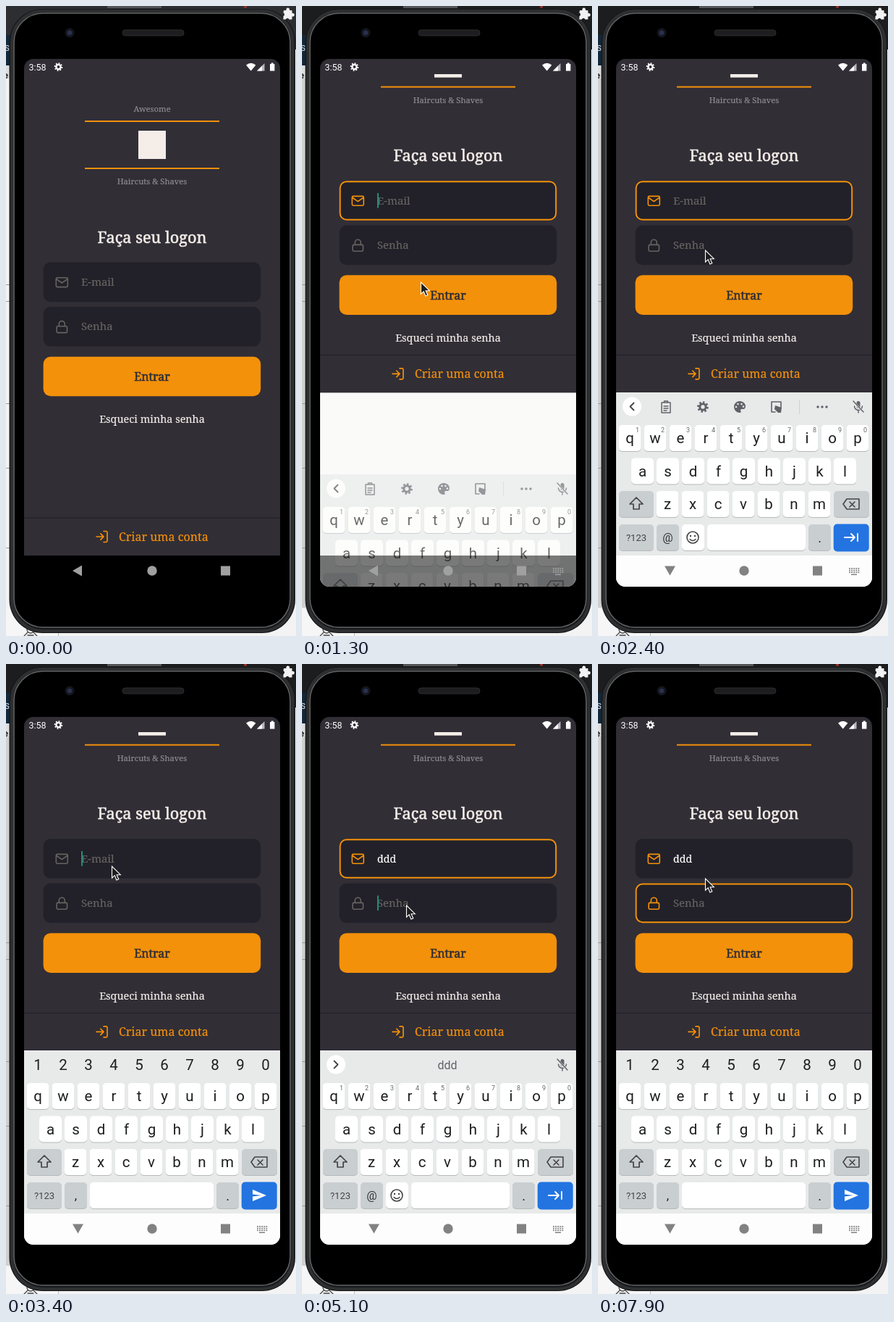
An HTML page for the animation above (8 s loop, 401 by 869 pixels).

```html
<!DOCTYPE html>
<html lang="pt-BR">
<head>
<meta charset="utf-8">
<title>Logon</title>
<style>
html, body { margin: 0; width: 100%; height: 100%; overflow: hidden; background: #fff; }
svg { display: block; width: 401px; height: 869px; }
.slab { font-family: "Roboto Slab", "Noto Serif", serif; stroke: currentColor; stroke-width: .2; }
.slab.medium { stroke-width: .6; }
.sans { font-family: Roboto, sans-serif; }
.line { fill: none; stroke-linecap: round; stroke-linejoin: round; }
</style>
</head>
<body>
<svg id="stage" viewBox="0 0 401 869" xmlns="http://www.w3.org/2000/svg"></svg>
<script>
const LOOP = 8000, STEP = 100;
const ORANGE = '#f4910a', DARK = '#312e36', FIELD = '#222129', HINT = '#666360', LIGHT = '#f4ede8';
const KEY = '#fff', GREY = '#c9ced1', INK = '#5f6368';

const rect = (x, y, w, h, fill, r = 0, more = '') =>
  `<rect x="${x}" y="${y}" width="${w}" height="${h}" rx="${r}" fill="${fill}" ${more}/>`;
const circle = (x, y, r, fill, more = '') => `<circle cx="${x}" cy="${y}" r="${r}" fill="${fill}" ${more}/>`;
const path = (d, fill, more = '') => `<path d="${d}" fill="${fill}" ${more}/>`;
const line = (d, color, w = 2, more = '') =>
  `<path class="line" d="${d}" stroke="${color}" stroke-width="${w}" ${more}/>`;
const text = (s, x, y, size, color, face = 'slab', anchor = 'middle', more = '') =>
  `<text class="${face}" x="${x}" y="${y}" font-size="${size}" color="${color}" fill="currentColor" text-anchor="${anchor}" ${more}>${s}</text>`;
const group = (id, body) => `<g id="${id}">${body}</g>`;
const at = (x, y, k, body) => `<g transform="translate(${x} ${y}) scale(${k}) translate(-12 -12)">${body}</g>`;
const gear = (x, y, k, color) => `<g transform="translate(${x} ${y}) scale(${k})">` +
  circle(0, 0, 3.1, 'none', `stroke="${color}" stroke-width="2.3"`) +
  circle(0, 0, 4.8, 'none', `stroke="${color}" stroke-width="2" pathLength="16" stroke-dasharray="1 1"`) + '</g>';

function backdrop() {
  return rect(0, 0, 401, 869, '#f3f3f3') + rect(0, 0, 401, 60, '#2d2e31', 0, 'id="bar"') +
    rect(0, 40, 12, 42, '#14283c') + rect(0, 82, 12, 18, '#dedede') +
    text('s', -2, 62, 14, '#cdd5dc', 'sans', 'start') +
    text('e', -4, 100, 13, '#222', 'sans', 'start', 'font-weight="700"') +
    rect(0, 100, 14, 730, '#f3f3f3', 0, 'id="strip"') +
    [384, 407, 548, 637, 747].map(y => rect(0, y, 8, 1, '#999')).join('') +
    rect(0, 832, 73, 37, '#f6f6f6') + rect(72, 855, 1, 14, '#bbb') +
    circle(34, 860, 5, 'none', 'stroke="#444" stroke-width="1.3"') +
    line('M25 869l5-5M43 869l-5-5M30 868h8', '#444', 1.3) +
    rect(140, 0, 75, 3, '#55565a') + circle(331, 1, 2, '#a33030');
}

function phone() {
  const puzzle = path('M384 6h3.5a2.5 2.5 0 1 1 4.6 0h3.4v4a2.4 2.4 0 1 1 0 4.4v4h-4a2.4 2.4 0 0 0-4.6 0h-3.4v-4.4a2.3 2.3 0 0 0 0-4.4z', '#f2f2f2');
  return rect(4.5, 4, 395.5, 861, '#17181a', 46) +
    rect(8, 7, 388.5, 855, 'none', 43, 'stroke="#2e2f31" stroke-width="4"') +
    rect(11, 10, 382, 847, '#000', 40, 'stroke="#626365" stroke-width="1.6"') +
    rect(161, 33, 85, 8, '#1d1d1f', 4, 'stroke="#2d2d2f"') +
    circle(88, 37, 6.5, '#15161d') + circle(88, 37, 3.2, '#2b3050') + puzzle;
}

const mailIcon = '<path class="line" d="M4 4h16a2 2 0 0 1 2 2v12a2 2 0 0 1-2 2H4a2 2 0 0 1-2-2V6a2 2 0 0 1 2-2zM22 6l-10 7L2 6" stroke-width="2"/>';
const lockIcon = '<path class="line" d="M5 11h14a2 2 0 0 1 2 2v7a2 2 0 0 1-2 2H5a2 2 0 0 1-2-2v-7a2 2 0 0 1 2-2zM7 11V7a5 5 0 0 1 10 0v4" stroke-width="2"/>';

function field(id, y, icon, hint) {
  return rect(51.6, y, 300.6, 54.6, FIELD, 10) +
    rect(52.6, y + 1, 298.6, 52.6, 'none', 9, `id="${id}Box" stroke="${ORANGE}" stroke-width="2"`) +
    group(id + 'Icon', at(77.3, y + 27.6, .8, icon)) +
    text(hint, 104, y + 32.4, 14.9, HINT, 'slab', 'start', `id="${id}Text"`) +
    rect(104, y + 16.9, 2, 20.5, '#1f8f78', 0, `id="${id}Caret"`);
}

function app() {
  const page = text('Awesome', 202, 146, 11.2, '#8d8a90') +
    rect(109, 158, 186, 2, ORANGE) + rect(183, 172, 38, 39, LIGHT) + rect(109, 223, 186, 2, ORANGE) +
    text('Haircuts &amp; Shaves', 202, 246, 11.2, '#8d8a90') +
    text('Faça seu logon', 202, 326.5, 21.7, LIGHT, 'slab medium') +
    field('mail', 353.6, mailIcon, 'E-mail') + field('pass', 415, lockIcon, 'Senha') +
    rect(51.6, 483.7, 300.6, 54.6, ORANGE, 10) +
    text('Entrar', 202, 517, 15.9, DARK, 'slab medium') +
    text('Esqueci minha senha', 202, 575, 14.4, LIGHT);
  const foot = rect(25, 706, 354, 52, DARK) + rect(25, 705.5, 354, 1.2, FIELD) +
    at(132.5, 732, .83, line('M15 3h4a2 2 0 0 1 2 2v14a2 2 0 0 1-2 2h-4M10 17l5-5-5-5M15 12H3', ORANGE)) +
    text('Criar uma conta', 156, 738, 16, ORANGE, 'slab', 'start');
  return rect(25, 73, 354, 685, DARK) + `<g clip-path="url(#body)">${group('page', page)}</g>` +
    rect(25, 533, 354, 268, '#fafaf9', 0, 'id="blank"') + group('foot', foot);
}

function status() {
  return text('3:58', 31.5, 88.5, 12.5, '#fff', 'sans', 'start') + gear(72.5, 84, 1, '#fff') +
    path('M332 81.5q6.7-5.5 13.4 0l-6.7 8z', '#fff') +
    path('M347 89.5L357.5 79v10.5z', '#bbb9bd') + path('M347 89.5l7-7v7z', '#fff') +
    path('M365 80h1.7v-1.5h3V80h1.7v9.5H365z', '#fff');
}

const key = (x, y, w, fill = KEY) => rect(x, y + 1, w, 36, '#b5b9bc', 5) + rect(x, y, w, 36, fill, 5);
const row = (s, x, y) => [...s].map((c, i) => key(x - 15.5 + i * 35, y, 31) +
  text(c, x + i * 35, y + 25, 20.5, '#1d1e20', 'sans')).join('');

function toolbar() {
  const clip = line('M88 547h12v14H88zM91.5 547v-2h5v2M91 552h6M91 555h6M91 558h4', INK, 1.5);
  const palette = path('M196 545a8 8 0 1 0 0 16c2 0 2-1.5 1.3-2.5-.8-1.5 0-2.5 1.7-2.5h2c2 0 3-2 3-4 0-4-4-7-8-7z', INK) +
    [[191, 553], [193.5, 549], [198.5, 549], [201, 552.5]].map(p => circle(...p, 1.3, '#e8eaea')).join('');
  const sticker = line('M245 560h-5v-14h13v8', INK, 1.6) + path('M245 551l9 3-1 7h-4l-5-5z', INK);
  const dots = [304, 310, 316].map(x => circle(x, 553, 1.7, INK)).join('');
  return line('M49.5 547.5l-5 5 5 5', '#444', 1.8) +
    clip + gear(145, 553, 1.35, INK) + palette + sticker + rect(278, 543, 1, 20, '#cfd2d3') + dots;
}

function keyboard() {
  const mic = rect(357.5, 545, 5, 10, INK, 2.5) + line('M354.5 552a5.5 5.5 0 0 0 11 0M360 558v3', INK, 1.5) +
    line('M353 546l14 14', '#e8eaea', 3) + line('M353 545l14 15', INK, 1.5);
  const common = rect(25, 533, 354, 225, '#e8eaea') + rect(25, 758, 354, 43, '#fdfdfd') +
    row('qwertyuiop', 44, 578) + row('asdfghjkl', 61.5, 623.5) + row('zxcvbnm', 96, 669) +
    key(29, 669, 48, GREY) + line('M53 678l-9 9h5v7h8v-7h5z', '#444', 1.7) +
    key(326, 669, 49, GREY) + line('M344 680h17v14h-17l-5-7zM348 684l7 7M355 684l-7 7', '#444', 1.6) +
    key(29, 715, 48, GREY) + text('?123', 53, 738, 13, '#444', 'sans') +
    key(291, 715, 31, GREY) + text('.', 306.5, 740, 18, '#222', 'sans') +
    rect(325.7, 714.5, 49, 38, '#2374e1', 5);
  const mail = circle(47, 552.5, 13, '#fff') + group('menu', toolbar()) +
    group('hints', line('M44.5 547.5l5 5-5 5', '#444', 1.8) +
      text('', 201, 558.5, 16, INK, 'sans', 'middle', 'id="guess"')) + mic +
    [...'1234567890'].map((c, i) => text(c, 54.5 + i * 35, 588, 9, '#666', 'sans')).join('') +
    key(81, 715, 31, GREY) + text('@', 96.5, 739, 16, '#333', 'sans') +
    key(116, 715, 31) + circle(131, 733, 8, 'none', 'stroke="#444" stroke-width="1.6"') +
    circle(128, 731, 1.2, '#444') + circle(134, 731, 1.2, '#444') + line('M127 735.5q4 4 8 0', '#444', 1.5) +
    key(151, 715, 136) + line('M341 733h14M350 728l5 5-5 5M359 728v10', '#fff', 1.9);
  const pass = [...'1234567890'].map((c, i) => text(c, 44 + i * 35, 560, 20.5, '#1d1e20', 'sans')).join('') +
    key(81, 715, 31, GREY) + text(',', 96.5, 739, 17, '#222', 'sans') + key(116, 715, 171) +
    path('M341 725l19 8-19 8v-6.5l12-1.5-12-1.5z', '#fff');
  return common + group('mailKeys', mail) + group('passKeys', pass);
}

function nav() {
  let dots = '';
  for (let r = 0; r < 3; r++) for (let c = 0; c < 5; c++) dots += rect(347 + c * 3.1, 775 + r * 2.7, 1.9, 1.7, 'currentColor');
  return rect(25, 758, 354, 44, '#000', 0, 'id="shade"') +
    group('icons', path('M92 779l13-7.5v15z', 'currentColor', 'id="back"') + circle(202, 779, 6.7, 'currentColor') +
      rect(297, 772.5, 13, 13, 'currentColor') + group('mini', dots + rect(350, 783.5, 8, 1.5, 'currentColor')));
}

document.getElementById('stage').innerHTML =
  `<defs><clipPath id="screen">${rect(25, 73, 354, 728, '#000', 13)}</clipPath>
  <clipPath id="body">${rect(25, 94, 354, 664, '#000')}</clipPath></defs>` +
  backdrop() + phone() +
  `<g clip-path="url(#screen)">${app()}${status()}${group('board', keyboard())}${nav()}</g>` +
  path('M.5 1v16.2l3.7-3.5 2.7 6.3 2.9-1.2-2.7-6.1h5.2z', '#1d1d1f', 'id="mouse" stroke="#fff" stroke-width="1.1"');

const el = {};
document.querySelectorAll('[id]').forEach(n => el[n.id] = n);
const show = (id, on) => { el[id].style.display = on ? '' : 'none'; };

// [time, value...] tables
const MOUSE = [[500, 54, 371], [600, 120, 374], [700, 164, 380], [1700, 164, 380], [1900, 180, 366],
  [2300, 148, 336], [3000, 148, 336], [3200, 146, 278], [3800, 146, 278], [4000, 331, 278], [4600, 331, 278],
  [5000, 144, 332], [5400, 144, 332], [5900, 92, 282], [6100, 64, 262], [6300, 75, 268], [6400, 80, 264],
  [6600, 332, 258], [6800, 82, 264], [7000, 210, 292], [7200, 332, 319], [7700, 332, 319], [7800, 150, 304], [7900, 148, 295]];
const BOARD = [[1200, 225, .5], [1300, 113, .65], [1400, 26, .92], [1500, 0, 1]];
const SHADE = [[1200, .9], [1300, .52], [1400, .15], [1500, 0]];
const TURN = [[1600, 0], [1800, -90]];
const FOCUS = [[0, ''], [900, 'mail'], [2700, ''], [3000, 'pass'], [3400, ''], [3700, 'mail'], [5200, ''], [5400, 'pass']];
const CARET = [[0, ''], [900, 'mail'], [2700, 'pass'], [3400, 'mail'], [4200, 'mail'], [4300, 'mail'], [4500, 'mail'], [5100, 'pass']];
const KEYS = [[0, 'mail'], [3000, 'pass'], [3700, 'mail'], [5400, 'pass']];
const TYPED = [[0, ''], [4200, 'd'], [4300, 'dd'], [4500, 'ddd']];

const pick = (table, t) => table.filter(r => r[0] <= t).pop();
function tween(table, t) {
  const i = table.findIndex(r => r[0] > t);
  if (i < 0) return table[table.length - 1].slice(1);
  if (i === 0) return table[0].slice(1);
  const a = table[i - 1], b = table[i], p = (t - a[0]) / (b[0] - a[0]);
  return a.slice(1).map((v, k) => v + (b[k + 1] - v) * p);
}

function draw(t) {
  const up = t >= 1200, typed = pick(TYPED, t)[1], focus = pick(FOCUS, t)[1], keys = pick(KEYS, t)[1];
  const [since, owner] = pick(CARET, t);
  const blink = Math.floor((t - since) / 500) % 2 === 0;

  el.bar.setAttribute('fill', t < 900 ? '#2d2e31' : '#1c1d1f');
  el.strip.setAttribute('fill', t < 900 ? '#f3f3f3' : '#cfcfce');
  el.page.setAttribute('transform', `translate(0 ${up ? -112.4 : 0})`);
  el.foot.setAttribute('transform', `translate(0 ${up ? -224.6 : 0})`);
  show('blank', up);

  for (const id of ['mail', 'pass']) {
    show(id + 'Box', focus === id);
    show(id + 'Caret', owner === id && blink);
    el[id + 'Icon'].setAttribute('stroke', focus === id || (id === 'mail' && typed) ? ORANGE : HINT);
    show(id + 'Keys', keys === id);
  }
  el.mailText.textContent = typed || 'E-mail';
  el.mailText.setAttribute('color', typed ? '#fff' : HINT);
  el.mailText.setAttribute('font-size', typed ? 14.2 : 14.9);
  el.mailCaret.setAttribute('x', 104 + typed.length * 8.8);
  el.guess.textContent = typed;
  show('menu', !typed);
  show('hints', !!typed);

  const [drop, alpha] = tween(BOARD, t);
  show('board', up);
  el.board.setAttribute('transform', `translate(0 ${drop})`);
  el.board.setAttribute('opacity', alpha);
  el.shade.setAttribute('opacity', up ? tween(SHADE, t)[0] : 1);
  el.icons.style.color = t < 1400 ? '#a0a0a0' : '#828282';
  el.back.setAttribute('transform', `rotate(${tween(TURN, t)[0]} 99 778.5)`);
  show('mini', up);

  show('mouse', t >= 500);
  el.mouse.setAttribute('transform', `translate(${tween(MOUSE, t).join(' ')})`);
}

const start = performance.now();
function tick(now) {
  const t = Math.max(0, now - start) % LOOP;
  draw(Math.floor(t / STEP) * STEP);
  requestAnimationFrame(tick);
}
draw(0);
requestAnimationFrame(tick);
</script>
</body>
</html>
```
